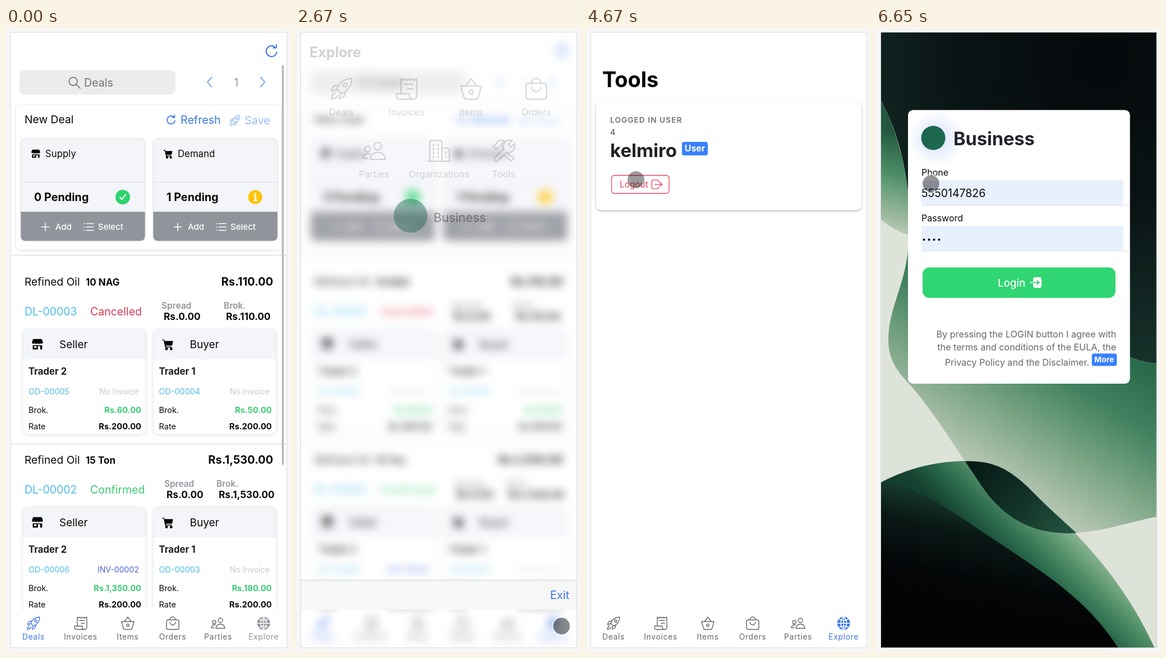
These frames come from a looping animation (506 by 1107 pixels, 7.3 s). An HTML page:

```html
<!DOCTYPE html>
<html lang="en">
<head>
<meta charset="utf-8">
<title>Deals app</title>
<style>
  html, body { margin: 0; width: 100%; height: 100%; overflow: hidden; background: #f6f6f6; }
  svg { display: block; width: 100vw; height: 100vh; font-family: Inter, "Open Sans", sans-serif; }
  .card { filter: drop-shadow(0 1px 3px #0002); }
  .raised { filter: drop-shadow(0 2px 2px #0004); }
</style>
</head>
<body>
<svg viewBox="0 0 506 1107">
  <defs>
    <clipPath id="phone"><path d="M9 8H500V1099H9Z"/></clipPath>
    <clipPath id="content"><path d="M9 8H500V1032H9Z"/></clipPath>
    <filter id="blur" x="-5%" y="-5%" width="110%" height="110%" color-interpolation-filters="sRGB"><feGaussianBlur stdDeviation="8"/></filter>
    <radialGradient id="glow"><stop stop-color="#d3dfff"/><stop offset="1" stop-color="#fff"/></radialGradient>
  </defs>
  <g id="stage"></g>
</svg>
<script>
const BLUE = '#3d78e3', PALE = '#9dbff4', SKY = '#4fbdea', GREEN = '#3bcb73', GRAY = '#92949c', INK = '#0a0a0a';
const USER = 'kelmiro', PHONE = '5550147826';

const text = (x, y, s, size, fill = INK, weight = 400, anchor = 'start', extra = '') =>
  `<text x="${x}" y="${y}" font-size="${size}" fill="${fill}" font-weight="${weight}" text-anchor="${anchor}" ${extra}>${s}</text>`;
const rect = (x, y, w, h, fill, r = 0, extra = '') =>
  `<rect x="${x}" y="${y}" width="${w}" height="${h}" rx="${r}" fill="${fill}" ${extra}/>`;
const circle = (x, y, r, fill, extra = '') => `<circle cx="${x}" cy="${y}" r="${r}" fill="${fill}" ${extra}/>`;
const path = (d, extra = '') => `<path d="${d}" ${extra}/>`;
const line = (x1, x2, y, color) => path(`M${x1} ${y}H${x2}`, `stroke="${color}"`);
const group = (body, extra) => `<g ${extra}>${body}</g>`;
const solid = 'fill="currentColor" stroke="none"';

// Icons live in a box from -12 to 12.
const icons = {
  rocket: path('M11-11C4-11-2-7-5 0L0 5C7 2 11-4 11-11ZM-3-4-8-3-11 2-5 1M4 3 3 8-2 11-1 5M-7 4C-10 5-10 8-11 11-8 10-5 10-4 7') + circle(4, -4, 2, 'none'),
  receipt: path('M-6 5V-11L-4-9-2-11 0-9 2-11 4-9 6-11 8-9 11-11V7Q11 11 7 11H-7Q-11 11-11 7V5H3V7Q3 11 7 11M-2-5H7M1 0H7'),
  basket: path('M-11-3H11L8 8Q7.4 11 5 11H-5Q-7.4 11-8 8ZM-6-3 0-11 6-3') + circle(0, 3.5, 2.2, 'none'),
  bag: path('M-8-6H8Q11-6 11-3V8Q11 11 8 11H-8Q-11 11-11 8V-3Q-11-6-8-6ZM-5-6C-5-13 5-13 5-6M-5-2A5 5 0 0 0 5-2'),
  people: circle(4, -5, 4, 'none') + circle(-7, -2, 3, 'none') + path('M-4 9C-4-1 12-1 12 9ZM-5 3C-9 2-12 5-12 8H-7'),
  globe: circle(0, 0, 11.5, 'currentColor', 'stroke="none"') +
    path('M0-11V11M-11 0H11M-8-7Q0-3 8-7M-8 7Q0 3 8 7M0-11C-7-6-7 6 0 11C7 6 7-6 0-11', 'stroke="#fff"'),
  building: path('M-10 11V-9Q-10-11-8-11H1Q3-11 3-9V11M3-3H9Q11-3 11-1V11M-12 11H12') +
    path('M-6-7V8M-1-7V8M7 1V9', 'stroke-dasharray="1.6 2.6"'),
  tools: path('M-10 8 0-2C-2-8 4-13 9-11L5-7 8-4 12-8C13-2 8 3 3 2L-7 11Q-11 12-10 8ZM-11-5-5-11H1L-3-6 0-3M3 2 11 8 8 11 0 4M-5-4-8-2-11-5'),
  refresh: path('M6-8A10 10 0 1 0 10 2M3-6H9V-12'),
  search: circle(-2.5, -2.5, 8, 'none') + path('M3.5 3.5 11 11'),
  left: path('M4-10-5 0 4 10'),
  right: path('M-4-10 5 0-4 10'),
  store: path('M-9-11H9L12-4Q10 1 6-2 3 1 0-2-3 1-6-2-10 1-12-4ZM-10 2H10V11H6V4H1V11H-10ZM-7 4V8H-2V4Z', solid + ' fill-rule="evenodd"'),
  cart: path('M-12-10H-8L-7-7H11L9 3H-4L-4 5H8V7H-6L-9-8H-12Z', solid) + circle(-3, 10, 2, 'currentColor') + circle(7, 10, 2, 'currentColor'),
  plus: path('M-11 0H11M0-11V11'),
  list: path('M-5-8H12M-5 0H12M-5 8H12M-11-8H-10M-11 0H-10M-11 8H-10'),
  logout: path('M4-5V-7Q4-10 1-10H-8Q-11-10-11-7V7Q-11 10-8 10H1Q4 10 4 7V5M-4 0H12M7-5 12 0 7 5'),
  check: path('M-6 0-2 5 6-5'),
};
const icon = (name, x, y, size, color, weight = 1.5) => {
  const k = size / 24;
  return group(icons[name], `transform="translate(${x} ${y}) scale(${k})" color="${color}" stroke="currentColor"
    stroke-width="${weight / k}" fill="none" stroke-linecap="round" stroke-linejoin="round"`);
};

const screen = rect(9, 8, 491, 1091, '#fff');
const logo = (x, y, r) => circle(x, y, r, '#1d6650');

const tabList = [[49, 'Deals', 'rocket'], [133, 'Invoices', 'receipt'], [217, 'Items', 'basket'],
  [297, 'Orders', 'bag'], [378, 'Parties', 'people'], [459, 'Explore', 'globe']];
const tabs = active => rect(9, 1032, 491, 67, '#fff') + tabList.map(([x, label, name], i) => {
  const color = active.includes(i) ? BLUE : i == 5 ? GRAY : '#66676b';
  return icon(name, x, 1056, 24, color, 1.4) + text(x, 1085, label, 13.8, color, 400, 'middle', 'letter-spacing=".7"');
}).join('');

function pendingCard(x, name, symbol, count, badge) {
  const body = rect(26, 196, 222, 182, '#f4f5f9', 9) +
    path('M26 326H248V369Q248 378 239 378H35Q26 378 26 369Z', `fill="${GRAY}"`) +
    rect(26, 196, 222, 182, 'none', 9, 'stroke="#d8dae0"') + line(26, 248, 273.5, '#dfe0e5') +
    icon(symbol, 53, 223, 16, '#000') + text(70, 229, name, 16.8) +
    text(50, 307, count + ' Pending', 19.8, INK, 700) + badge +
    icon('plus', 70, 353, 14, '#fff') + text(88, 358, 'Add', 15, '#fff', 500) +
    icon('list', 147, 353, 18, '#fff') + text(164, 358, 'Select', 15, '#fff', 500);
  return group(body, `transform="translate(${x})"`);
}

function sideCard(x, role, symbol, client, order, invoice, brokerage) {
  const body = rect(30.5, 534.5, 218, 186, '#fff', 9, 'class="card"') +
    path('M31 588V544Q31 535 40 535H239Q248 535 248 544V588Z', 'fill="#f4f5f9"') +
    path('M30.5 588V544Q30.5 534.5 40 534.5H239Q248.5 534.5 248.5 544V588', 'fill="none" stroke="#e9eaee"') +
    icon(symbol, 56, 561, 20, '#000') + text(95, 568, role, 19) +
    text(40, 615, client, 16.7, '#1c1c1e', 700) + text(40, 650, order, 14.4, SKY) +
    text(237, 650, invoice, 14.1, invoice[0] == 'I' ? '#4f62d6' : '#c8c9cc', 400, 'end') +
    text(40, 683, 'Brok.', 14.5) + text(241, 683, brokerage, 14.7, GREEN, 700, 'end') +
    text(40, 712, 'Rate', 14.5) + text(241, 712, 'Rs.200.00', 14.7, INK, 700, 'end');
  return group(body, `transform="translate(${x})"`);
}

function deal(y, d) {
  const body = text(33, 457, 'Refined Oil', 19.2) + text(142, 457, d.amount, 17, INK, 700) +
    text(476, 457, d.total, 20, INK, 700, 'end') +
    text(33, 510, d.id, 19.5, SKY) + text(150, 510, d.status, 19.5, d.color) +
    text(d.spreadX, 498, 'Spread', 15.4, GRAY, 600) + text(d.spreadX + 4, 518, 'Rs.0.00', 17.2, INK, 700) +
    text(d.brokX, 498, 'Brok.', 15.4, GRAY, 600) + text(d.brokX + 4, 518, d.total, 17.2, INK, 700) +
    sideCard(0, 'Seller', 'store', 'Trader 2', ...d.seller) + sideCard(232.5, 'Buyer', 'cart', 'Trader 1', ...d.buyer);
  return group(body, `transform="translate(0 ${y})"`);
}

const dealsPage = active => screen + group(
  icon('refresh', 473, 41, 23, BLUE, 2) +
  rect(24, 75, 278, 43, '#ececec', 9) + icon('search', 122, 97, 22, '#666') + text(139, 104, 'Deals', 19.6, '#737373') +
  icon('left', 363, 96, 20, '#8db7f0', 2.4) + text(410, 104, '1', 20, '#999', 400, 'middle') + icon('right', 457, 96, 20, '#8db7f0', 2.4) +
  rect(18, 137, 473, 256, '#fff', 8, 'class="card"') + text(33, 169, 'New Deal', 19.3) +
  icon('refresh', 294, 163, 17, BLUE, 1.8) + text(311, 170, 'Refresh', 19.7, BLUE) +
  icon('rocket', 408, 164, 19, PALE) + text(425, 171, 'Save', 19.6, PALE) +
  pendingCard(0, 'Supply', 'store', 0, circle(208, 300, 13, '#2dd36f') + icon('check', 208, 300, 20, '#fff', 2)) +
  pendingCard(236, 'Demand', 'cart', 1, circle(208, 300, 12.5, '#ffc409') +
    path('M205.5 298H208.5V306M205 306H212', 'stroke="#fff" stroke-width="2.4" fill="none"') + circle(208, 294, 1.8, '#fff')) +
  line(9, 500, 403, '#cfcfd1') + line(9, 500, 738, '#cfcfd1') +
  deal(0, { amount: '10 NAG', total: 'Rs.110.00', id: 'DL-00003', status: 'Cancelled', color: '#d23f55', spreadX: 277, brokX: 388,
    seller: ['OD-00005', 'No Invoice', 'Rs.60.00'], buyer: ['OD-00004', 'No Invoice', 'Rs.50.00'] }) +
  deal(316, { amount: '15 Ton', total: 'Rs.1,530.00', id: 'DL-00002', status: 'Confirmed', color: GREEN, spreadX: 282, brokX: 375,
    seller: ['OD-00006', 'INV-00002', 'Rs.1,350.00'], buyer: ['OD-00003', 'No Invoice', 'Rs.180.00'] }),
  'clip-path="url(#content)"') + tabs(active);
const scrollbar = rect(491.5, 66, 3.5, 709, '#b9b9b9', 1.7);

const menuItems = [[81, 108, 'Deals', 'rocket'], [197, 108, 'Invoices', 'receipt'], [312, 108, 'Items', 'basket'], [428, 108, 'Orders', 'bag'],
  [139, 218, 'Parties', 'people'], [255, 218, 'Organizations', 'building'], [370, 218, 'Tools', 'tools']];
const explorePage = (veil, ink, active) => screen +
  group(group(dealsPage(active), 'filter="url(#blur)"'), 'clip-path="url(#phone)"') +
  rect(9, 8, 491, 1091, '#fff', 0, `opacity="${veil}"`) +
  group(text(24, 52, 'Explore', 25, '#111', 700) + menuItems.map(([x, y, label, name]) =>
    icon(name, x, y, 40, '#333', 2.2) + text(x, y + 47, label, 16.5, '#333', 400, 'middle')).join(''), `opacity="${ink}"`) +
  group(logo(204, 333, 30) + text(245, 344, 'Business', 22, '#222'), `opacity="${Math.min(1, ink * 2.4)}"`) +
  rect(9, 980, 491, 52, '#f7f7f7') + line(9, 500, 979.5, '#cfcfd1') + text(487, 1013, 'Exit', 20, BLUE, 400, 'end');

function toolsPage(opacity, pressed) {
  const red = '#ee465c', label = pressed ? '#fff' : red;
  return screen + group(
    text(29, 105, 'Tools', 37.8, '#000', 700) + rect(18, 131, 473, 192, '#fff', 9, 'class="raised"') +
    text(43, 168, 'LOGGED IN USER', 13.6, '#707074', 600, 'start', 'letter-spacing="1.1"') + text(43, 190, '4', 14, '#707074', 600) +
    text(43, 229, USER, 33, '#222226', 700) +
    rect(171, 202, 46, 24, '#3880ff', 4) + text(194, 219, 'User', 15.8, '#fff', 700, 'middle') +
    rect(45.5, 261.5, 102.5, 32, pressed ? red : '#fff', 5, `stroke="${red}" stroke-width="1.3"`) +
    text(60, 283, 'Logout', 15.4, label) + icon('logout', 126, 277.5, 19, label, 1.4), `opacity="${opacity}"`) + tabs([5]);
}

const stops = list => list.map(([at, color]) => `<stop offset="${at}" stop-color="${color}"/>`).join('');
const linear = (id, [x1, y1, x2, y2], list) =>
  `<linearGradient id="${id}" gradientUnits="userSpaceOnUse" x1="${x1}" y1="${y1}" x2="${x2}" y2="${y2}">${stops(list)}</linearGradient>`;
const radial = (id, [x, y, r], list) =>
  `<radialGradient id="${id}" gradientUnits="userSpaceOnUse" cx="${x}" cy="${y}" r="${r}">${stops(list)}</radialGradient>`;
const wallpaper = group(
  radial('night', [400, 60, 530], [[0, '#05080a'], [.5, '#0a1414'], [1, '#16302a']]) +
  linear('leaf', [55, 190, 9, 350], [[0, '#22583f'], [.45, '#4f9068'], [1, '#b4c6b1']]) +
  linear('fold', [470, 590, 290, 880], [[0, '#27694a'], [.3, '#438260'], [.6, '#7ba585'], [.9, '#b4c5b1'], [1, '#bccab8']]) +
  linear('wave', [274, 1005, 371, 906], [[0, '#14402f'], [.35, '#2a694b'], [.7, '#58956d'], [1, '#8fb795']]) +
  linear('lens', [180, 770, 340, 900], [[0, '#071b17'], [.5, '#123227'], [1, '#235340']]) +
  linear('deep', [150, 806, 90, 1080], [[0, '#1c4a39'], [.3, '#0a1816'], [.6, '#030507'], [1, '#020304']]) +
  rect(9, 8, 491, 1091, '#dee3da') +
  path('M9 128C35 180 48 225 57 290V367Q32 359 9 340Z', 'fill="url(#leaf)"') +
  path('M9 8H500V595C440 590 410 560 370 500L57 290C48 220 35 180 9 128Z', 'fill="url(#night)"') +
  path('M57 395C50 460 22 500 22 553C22 605 55 622 83 660C120 708 155 765 190 815C230 872 282 896 342 896C400 896 455 875 500 867V595C440 590 410 560 370 500L57 300Z', 'fill="url(#fold)"') +
  path('M9 806C55 782 105 768 165 768C230 768 265 812 310 853C390 926 450 1000 496 1099H9Z', 'fill="url(#wave)"') +
  path('M159 769C235 764 265 812 310 853L357 896C282 900 230 872 190 815Z', 'fill="url(#lens)"') +
  path('M9 806C70 812 125 850 190 894C285 958 370 1005 431 1099H9Z', 'fill="url(#deep)"') +
  path('M500 8V1099', 'stroke="#dcdcdc"'), 'clip-path="url(#phone)"');

function loginPage(filled) {
  const field = (y, label, value) => (filled
    ? text(81, y - 52, label, 16, INK) + rect(81, y - 44, 359.5, 44, '#e8f0fe') + value
    : text(81, y - 14, label, 19.5)) + line(81, 452, y + .5, '#dedee0');
  const dots = [0, 1, 2, 3].map(i => circle(85.5 + i * 9, 375.5, 2, '#000')).join('');
  return wallpaper + rect(57, 145.5, 395.5, 485.5, '#fff', 9) +
    `<ellipse cx="108" cy="196" rx="50" ry="49" fill="url(#glow)"/>` + logo(102, 195, 21.5) +
    text(138, 208, 'Business', 32.5, '#23232d', 700) +
    field(314, 'Phone', text(81, 300, PHONE, 19.5)) + field(395, 'Password', dots) +
    rect(83, 424.7, 343.7, 54, filled ? '#2fd671' : '#c9cacf', 12) + text(217, 459, 'Login', 18.6, '#fff', 500) +
    rect(280, 442, 15, 19, '#fff', 4) + path('M274 451.5H280', 'stroke="#fff" stroke-width="1.8"') +
    path('M280 451.5H290M286.5 447.5 290.5 451.5 286.5 455.5', `stroke="${filled ? '#2fb866' : '#b5b6bc'}" stroke-width="1.7" fill="none"`) +
    text(428, 549, 'By pressing the LOGIN button I agree with', 16.2, '#666', 400, 'end') +
    text(428, 572, 'the terms and conditions of the EULA, the', 16.2, '#666', 400, 'end') +
    text(380, 599, 'Privacy Policy and the Disclaimer.', 16.2, '#666', 400, 'end') +
    rect(384.5, 577.5, 44.5, 22, '#3880ff', 4) + text(406.5, 592.5, 'More', 13.8, '#fff', 700, 'middle');
}

const pointer = (x, y, alpha = .39, ring = '') => circle(x, y, 15, '#000', `opacity="${alpha}"`) +
  (ring && circle(x, y, 16, 'none', `stroke="${ring}" stroke-width="2.5" opacity=".5"`));
const status = rect(9, 1067, 161, 33, '#6cc5c8', 3, 'opacity=".86" style="filter:drop-shadow(0 1px 4px #0005)"') +
  text(17, 1090, 'Waiting for bu...', 18.1, '#333');

// Each step: start time in ms and the picture that holds until the next one.
const steps = [
  [0, () => dealsPage([0]) + scrollbar],
  [2000, () => dealsPage([0]) + scrollbar + pointer(490, 961)],
  [2330, () => dealsPage([0]) + scrollbar + pointer(482, 1050)],
  [2670, () => explorePage(.14, .19, [0, 5]) + pointer(473, 1061, .46, '#fff')],
  [3000, () => explorePage(.88, 1, [5]) + pointer(473, 1061)],
  [3330, () => explorePage(.92, 1, [5]) + pointer(471, 800)],
  [3670, () => explorePage(.92, 1, [5]) + pointer(365, 228) + status],
  [4000, () => toolsPage(.4, false) + pointer(365, 228) + status],
  [4330, () => toolsPage(1, false) + pointer(286, 228)],
  [4670, () => toolsPage(1, false) + pointer(89, 269)],
  [5000, () => toolsPage(1, false) + pointer(98, 276)],
  [5330, () => toolsPage(1, true) + pointer(98, 276, .48, '#fff')],
  [5670, () => loginPage(false) + pointer(98, 276)],
  [6000, () => loginPage(true) + pointer(98, 276, .42, '#fff')],
];
const LOOP = 7300;
const stage = document.getElementById('stage');
const frame = rect(8.5, 7.5, 492, 1092, 'none', 0, 'stroke="#dadada"');
let shown = -1;

function draw(now) {
  const time = now % LOOP;
  const index = steps.findLastIndex(([start]) => start <= time);
  if (index !== shown) stage.innerHTML = frame + steps[shown = index][1]();
  requestAnimationFrame(draw);
}
draw(0);
</script>
</body>
</html>
```
